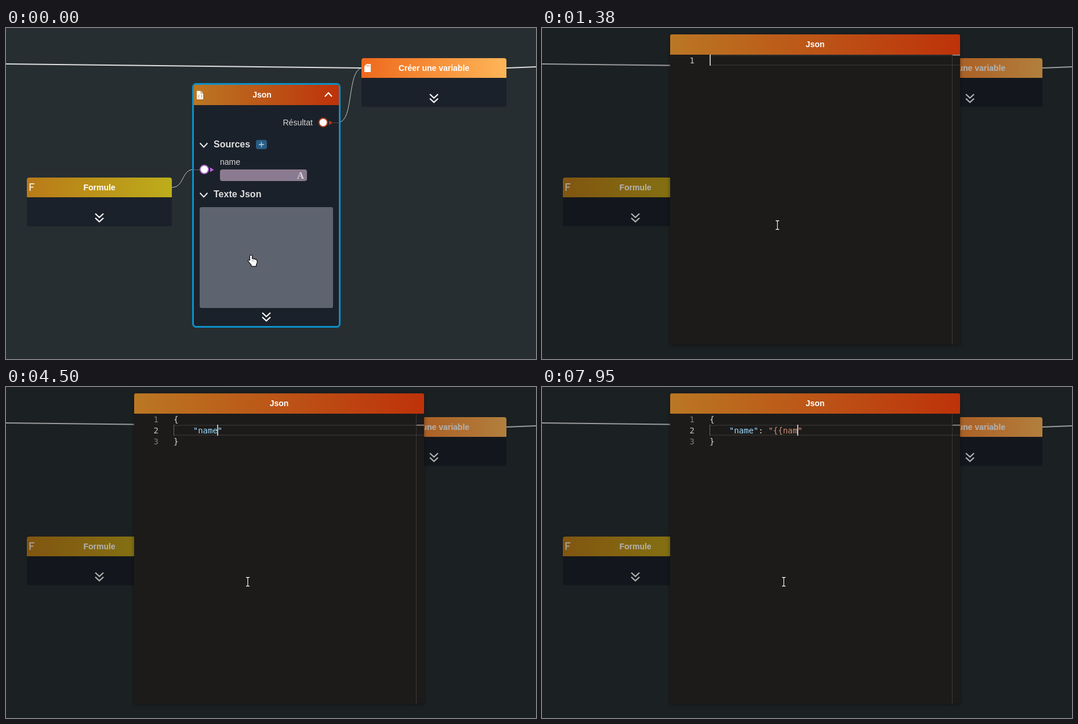
Write an HTML page with a canvas that moves like this. It is 914x571 px and loops after 8 s.

```html
<!DOCTYPE html>
<html lang="fr">
<head>
<meta charset="utf-8">
<title>Éditeur Json</title>
<style>
html, body { margin: 0; width: 100%; height: 100%; overflow: hidden; background: #272e31; }
canvas { display: block; }
</style>
</head>
<body>
<canvas id="stage" width="914" height="571"></canvas>
<script>
const ctx = document.getElementById('stage').getContext('2d');
const W = 914, H = 571, LOOP = 8000;
const SANS = '"Liberation Sans", Arial, sans-serif';
const MONO = '14px "DejaVu Sans Mono", monospace';
const JSON_COLORS = ['#ba7723', '#be320a'];
const BODY = '#1b212a', KEY = '#9cdcfe', STR = '#ce9178', PLAIN = '#d8d8d8';
const LEFT = 289, TOP = 46, ROW = 19, CHAR = 8.43;

// [time, text of the edited line, caret column]
const edits = [
  [1380, '', 0], [2380, '', 0], [2600, '{}', 1], [3230, '    ', 4],
  [3600, '    ""', 5], [4000, '    "n"', 6], [4200, '    "na"', 7],
  [4400, '    "nam"', 8], [4500, '    "name"', 9], [4800, '    "name"', 10],
  [5500, '    "name":', 11], [5950, '    "name": ', 12], [6400, '    "name": ""', 13],
  [7100, '    "name": "{"', 14], [7250, '    "name": "{{"', 15],
  [7680, '    "name": "{{n"', 16], [7730, '    "name": "{{na"', 17],
  [7950, '    "name": "{{nam"', 18]
];

function box(x, y, w, h, r, fill) {
  ctx.fillStyle = fill;
  ctx.beginPath();
  ctx.roundRect(x, y, w, h, r);
  ctx.fill();
}

function stroke(path, color, width = 1) {
  ctx.strokeStyle = color;
  ctx.lineWidth = width;
  ctx.stroke(new Path2D(path));
}

function fill(path, color) {
  ctx.fillStyle = color;
  ctx.fill(new Path2D(path));
}

function label(str, x, y, font, color, align = 'left') {
  ctx.font = font;
  ctx.fillStyle = color;
  ctx.textAlign = align;
  ctx.fillText(str, x, y);
}

function ramp(x, w, [a, b]) {
  const g = ctx.createLinearGradient(x, 0, x + w, 0);
  g.addColorStop(0, a);
  g.addColorStop(1, b);
  return g;
}

function header(title, x, y, w, h, colors, r = 3) {
  box(x, y, w, h, [r, r, 0, 0], ramp(x, w, colors));
  label(title, x + w / 2, y + 22, `bold 14px ${SANS}`, '#fff', 'center');
}

function chevron(x, y, rx, ry, color = '#fff', width = 2) {
  stroke(`M${x - rx} ${y - ry / 2}L${x} ${y + ry / 2}L${x + rx} ${y - ry / 2}`, color, width);
}

function expander(x, y) {
  chevron(x, y - 3.5, 7, 6.5, '#fff', 2.2);
  chevron(x, y + 4, 7, 6.5, '#fff', 2.2);
}

function smallNode(title, x, y, colors) {
  box(x, y, 250, 84, 4, BODY);
  header(title, x, y, 250, 34, colors, 4);
}

function port(x, y, ring, arrow) {
  ctx.beginPath();
  ctx.arc(x, y, 7.2, 0, 7);
  ctx.fillStyle = '#fff';
  ctx.fill();
  ctx.strokeStyle = ring;
  ctx.lineWidth = 2;
  ctx.stroke();
  fill(`M${x + 10} ${y - 3.5}l6.5 4l-6.5 4z`, arrow);
}

function section(title, y) {
  chevron(341, y + 2, 6.5, 7, '#e6e6e6');
  label(title, 358, y + 6, `bold 16px ${SANS}`, '#dedede');
}

function jsonNode() {
  box(321, 95, 256, 422, 7, '#0d90c8');
  box(324, 98, 250, 416, 4, BODY);
  header('Json', 324, 98, 235, 35, JSON_COLORS);
  box(324, 98, 250, 35, [3, 3, 0, 0], ramp(324, 250, JSON_COLORS));
  label('Json', 441.5, 120, `bold 14px ${SANS}`, '#fff', 'center');
  fill('M329 108.5h7l4 4v10.500h-11z', '#fff');
  stroke('M336 108.500v4h4', '#b8762a');
  stroke('M333.500 115l-2 2.500l2 2.500M336 115l2 2.500l-2 2.500', '#b8762a');
  chevron(556, 115, 6, -6.5);

  label('Résultat', 477.5, 168, `14px ${SANS}`, '#d6d6d6');
  port(547, 163, '#b8431c', '#b5340f');
  stroke('M564 163.500H574', '#653a30');

  section('Sources', 200);
  box(431, 193, 19, 16, 4, '#2a5d84');
  stroke('M436 201h9M440.500 196.500v9', '#b8d8ea', 1.3);
  label('name', 369, 236, `14px ${SANS}`, '#d6d6d6');
  box(369, 244, 150, 20, 4, '#8a7b90');
  label('A', 508, 260, 'bold 17px "Liberation Serif", serif', '#dcd7df', 'center');
  stroke('M324 244.500H334', '#596066');
  port(342, 244, '#a467c6', '#bd65e0');

  section('Texte Json', 286);
  box(334, 309, 230, 174, 3, '#5e6370');
  expander(449, 498);
}

function scene() {
  ctx.fillStyle = '#272e31';
  ctx.fillRect(0, 0, W, H);
  stroke('M0 62L613 69M863 69L914 67', '#dedede', 1.8);
  stroke('M574 162.500C600 161 588 72 614 69', '#c4c6c7');
  stroke('M286 275C308 275 302 244 324 244', '#c4c6c7');

  smallNode('Formule', 36, 258, ['#b97a18', '#bdad1b']);
  stroke('M41.500 281V268.700H49M41.500 274.500H47.500', '#fff', 1.6);
  expander(161, 327);
  // title sits slightly right of the middle
  smallNode('Créer une variable', 613, 52, ['#ee691b', '#ffb658']);
  fill('M622 62h7v14h-11v-10z', '#fff');
  stroke('M622.500 64v2.500M624.700 64v2.500M626.900 64v2.500', '#ee7a2c');
  expander(738, 121);
  jsonNode();
}

function code(str, col, row, color) {
  label(str, LEFT + col * CHAR, TOP + row * ROW + 15, MONO, color);
}

function editor(t) {
  let edit = [1380, '', 0];
  for (const e of edits) if (t >= e[0]) edit = e;
  const [since, text, col] = edit;
  const open = t >= 3230, row = open ? 1 : 0, y = TOP + row * ROW;

  ctx.fillStyle = '#2d2c2b';
  ctx.fillRect(LEFT, y, 432, 2);
  ctx.fillRect(LEFT, y + ROW - 2, 432, 2);
  ctx.fillStyle = '#3b3a39';
  ctx.fillRect(707, TOP, 1, 500);
  ctx.fillStyle = '#9b9691';
  ctx.fillRect(708, y, 13, 1.5);

  for (let i = 0; i < (open ? 3 : 1); i++)
    label(i + 1, 263, TOP + i * ROW + 15, MONO, i === row ? '#c6c6c6' : '#7d7d7d', 'right');

  if (open) {
    code('{', 0, 0, PLAIN);
    code('}', 0, 2, PLAIN);
    ctx.fillStyle = '#666';
    ctx.fillRect(LEFT, y, 1, ROW);
    code(text.slice(4, 10), 4, 1, KEY);
    code(text.slice(10, 12), 10, 1, PLAIN);
    code(text.slice(12), 12, 1, STR);
  } else {
    code(text, 0, 0, PLAIN);
  }

  if ((t >= 3900 && t < 4000) || (t >= 5000 && t < 6880)) {
    ctx.fillStyle = '#cb150f';
    ctx.fillRect(714, 84, 7, 19);
    stroke('M289 102l2-2l2 2l2-2l2 2', '#d23c30', 1.2);
  }

  if (t >= 1380 && (t - since) % 960 < 480) {
    ctx.fillStyle = '#b9bab8';
    ctx.fillRect(Math.floor(LEFT + col * CHAR), y, 2, ROW);
  }
}

function panel(t) {
  ctx.fillStyle = 'rgba(0,0,0,.3)';
  ctx.fillRect(0, 0, W, H);
  ctx.save();
  ctx.globalAlpha = Math.min(1, 0.3 + 0.7 * (t - 730) / 120);
  ctx.shadowColor = 'rgba(0,0,0,.4)';
  ctx.shadowBlur = 7;
  ctx.shadowOffsetY = 2;
  box(221, 11, 500, 535, 3, '#1d1b1a');
  ctx.shadowColor = 'transparent';
  header('Json', 221, 11, 500, 35, JSON_COLORS);
  editor(t);
  ctx.restore();
}

function hand(x, y) {
  const p = `M${x - 4} ${y - 8}q1.500 -1.500 3 0v6q2 -1.500 3 .5q2 -1 3 .5q2.500 -.5 2.500 2v3l-1.500 3v2.500h-7.500v-2l-5.500 -6.500q0 -2 2 -1l1 1z`;
  stroke(p, '#111', 2.4);
  fill(p, '#fff');
  stroke(`M${x - .5} ${y - 1}v3M${x + 2.500} ${y - .5}v3`, '#777', 0.7);
}

function beam(x, y) {
  const p = `M${x - 3} ${y - 7.500}h2.300l.7 .7l.7 -.7h2.300M${x - 3} ${y + 7.500}h2.300l.7 -.7l.7 .7h2.300M${x} ${y - 7}v14`;
  stroke(p, '#000', 3.4);
  stroke(p, '#fff', 1.3);
}

// share of a move done, in n equal jumps from a to b
function jumps(t, a, b, n) {
  if (t < a) return 0;
  return Math.min(1, (1 + Math.floor((t - a) / (b - a) * (n - 1))) / n);
}

function pointer(t) {
  if (t < 730) return hand(425, 401);
  const up = jumps(t, 1130, 1380, 4), back = jumps(t, 1680, 1880, 3);
  beam(Math.round(421 - 15 * up + 11 * back), Math.round(395 - 55 * up - 4 * back));
}

function frame(now) {
  const t = now % LOOP;
  scene();
  if (t >= 730) panel(t);
  pointer(t);
  requestAnimationFrame(time => frame(time - start));
}

const start = performance.now();
frame(0);
</script>
</body>
</html>
```
